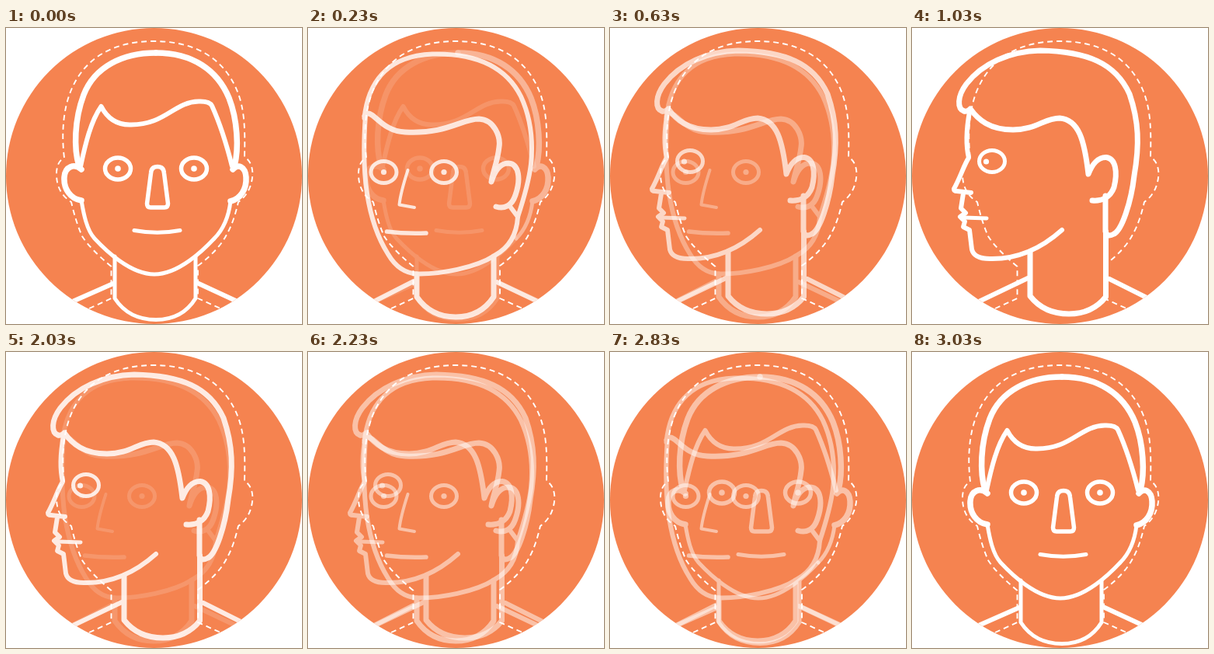
Animation, 381 px wide and 381 px high, one loop 4.03 s. Source, as an HTML page:

```html
<!DOCTYPE html>
<html lang="en">
<head>
<meta charset="utf-8">
<title>Turning head</title>
<style>
  html, body { margin: 0; width: 100%; height: 100%; overflow: hidden; background: #fff; }
  svg { display: block; width: 100vw; height: 100vh; }
  .lines { fill: none; stroke: #fff; stroke-width: 6; stroke-linecap: round; stroke-linejoin: round; }
  .thin { stroke-width: 5; }
  .thick { stroke-width: 7.5; }
  .dot { fill: #fff; stroke: none; }
  .outline { stroke-width: 1.9; stroke-dasharray: 7 5; stroke-linecap: butt; }
  .rim, .front, .turned, .profile { animation: 4030ms step-end infinite; }
  .rim { animation-name: rim; }
  .front { animation-name: front; }
  .turned { animation-name: turned; }
  .profile { animation-name: profile; }

  /* Hard steps between the three poses; the far side of the front head lingers */
  @keyframes front {
    0% { opacity: 1; }
    .744% { opacity: .35; }
    5.707% { opacity: .14; }
    10.67% { opacity: 0; }
    65.261% { opacity: .18; }
    70.223% { opacity: .5; }
    75.186%, 100% { opacity: 1; }
  }
  @keyframes rim {
    0% { opacity: 1; }
    .744% { opacity: .4; }
    10.67% { opacity: 0; }
    65.261% { opacity: .2; }
    70.223% { opacity: .5; }
    75.186%, 100% { opacity: 1; }
  }
  @keyframes turned {
    0% { opacity: 0; }
    .744% { opacity: .65; }
    5.707% { opacity: .8; }
    10.67% { opacity: 1; }
    15.633% { opacity: .33; }
    20.596% { opacity: .16; }
    25.558% { opacity: 0; }
    50.372% { opacity: .16; }
    55.335% { opacity: .5; }
    60.298% { opacity: 1; }
    65.261% { opacity: .84; }
    70.223% { opacity: .5; }
    75.186%, 100% { opacity: 0; }
  }
  @keyframes profile {
    0% { opacity: 0; }
    15.633% { opacity: .68; }
    20.596% { opacity: .84; }
    25.558% { opacity: 1; }
    50.372% { opacity: .84; }
    55.335% { opacity: .5; }
    60.298%, 100% { opacity: 0; }
  }
</style>
</head>
<body>
<svg viewBox="0 0 381 381">
  <clipPath id="disc"><circle cx="190.5" cy="190.5" r="190.5"/></clipPath>
  <circle cx="190.5" cy="190.5" r="190.5" fill="#f58350"/>
  <g class="lines" clip-path="url(#disc)">

    <g class="rim thick">
      <path d="M193 32C240 32 272 54 287 90C298 118 300 155 294 178"/>
      <path d="M292 182C298 174 308 178 309 192C310 207 302 220 289 223"/>
      <path class="thin" d="M289 223C287 240 282 257 268 271"/>
    </g>
    <g class="front">
      <g class="thick">
        <path d="M94 178C87 155 88 118 100 86C114 50 150 32 193 32"/>
        <path d="M97 182C88 174 76 178 75 192C74 207 83 220 97 222"/>
      </g>
      <path d="M96 178C102 150 109 120 122.500 101Q135 125 160 124.500C205 125 216 95 248 94.500Q262 94 265 100C275 122 284 150 291 178"/>
      <path class="thin" d="M97 222C100 240 104 260 114 271C128 286 160 317 191 317C222 317 254 286 268 271"/>
      <g stroke-width="5.5">
        <ellipse cx="144" cy="181" rx="16.500" ry="14"/>
        <ellipse cx="242" cy="181" rx="16.500" ry="14"/>
        <circle class="dot" cx="144" cy="181" r="3.800"/>
        <circle class="dot" cx="242" cy="181" r="3.800"/>
        <path d="M186.500 187Q187 178.500 195 178.500Q203 178.500 203.500 187L208.500 226Q208.500 231 204 231H186Q181.500 231 181.500 226Z"/>
      </g>
      <path class="thin" d="M165 260.500Q195 266 224 260.500"/>
      <path class="thin" d="M140 294V348Q158 375.500 193 375.500Q227 375.500 244 348V294"/>
      <path d="M139 328.500L80 354.500M247 328.500L301 353.500"/>
    </g>

    <g class="turned">
      <path d="M72.500 116C77 72 100 36 160 33.500C225 32 258 56 274 88C286 114 290 145 287 175C284 200 276 225 270 243"/>
      <path d="M74 112C72 140 71 180 76 213C81 245 91 272 103 291C113 308 125 316 141 316.500C170 317 215 309 240 293C262 281 269 262 270 243"/>
      <path stroke-width="7" d="M73 113C82 100 92 133 125 134C178 137 198 117 220 117C240 118 248 140 246 153C244 172 238 185 236 198C240 185 246 174 258 174C272 175 274 195 267 215C262 230 252 233 242 230"/>
      <path d="M261 231L270 243"/>
      <g class="thin">
        <ellipse cx="97.500" cy="185.500" rx="16.500" ry="14"/>
        <ellipse cx="175" cy="185.500" rx="16.500" ry="14"/>
        <circle class="dot" cx="97.500" cy="185.500" r="3.600"/>
        <circle class="dot" cx="175" cy="185.500" r="3.600"/>
        <path stroke-width="4" d="M128.500 183C123 200 119 213 117.500 227.500L137 231"/>
        <path stroke-width="5.500" d="M101.500 262Q125 265 152 264"/>
      </g>
      <path stroke-width="7" d="M140 317V346Q158 372 190 372Q222 372 239 346V294"/>
      <path d="M136 326L80 354.500M243 327L301 354.500"/>
    </g>

    <g class="profile" stroke-width="7">
      <path d="M67 107C58 104 58 88 70 72C90 46 125 30 165 29C225 30 262 45 280 85C292 120 293 150 286 190C282 225 270 260 260 265Q251 270 249 262V216"/>
      <path d="M67 107Q72 108 75 104C85 118 100 131 130 131C160 131 170 116 190 116C215 118 222 145 227 188C232 175 240 166 250 166.500C262 168 265 185 260 205C255 219 243 223 232 222"/>
      <path stroke-width="6" d="M74 108C70 130 69 150 73 167C67 176 62 193 54 207Q54 210 58 210L76 212M66 213L63 232L69 238L62 243L68 249L66 256L74 260L77 285Q80 297 100 297C135 298 165 285 193 260"/>
      <path class="thin" d="M67 244L96 245"/>
      <ellipse class="thin" cx="103" cy="171.500" rx="16.500" ry="14"/>
      <circle class="dot" cx="95.500" cy="172" r="3.600"/>
      <path d="M152 288V345Q170 368 202 368Q232 368 249.500 346V262"/>
      <path stroke-width="6" d="M149 322L80 355M254 323L312 352"/>
    </g>

    <path class="outline" d="M107 361L135.500 348V307Q108 284 98 268Q90 250 84 224Q65 212 65 188Q65 172 75 167C71 135 74 105 83 82C101 37 140 17 190 17C241 17 280 37 298 82C307 105 308 130 307 166Q317 172 317.500 188Q316 212 299 224Q293 250 285 264Q275 285 247 306V348L276 361"/>
  </g>
</svg>
</body>
</html>
```
